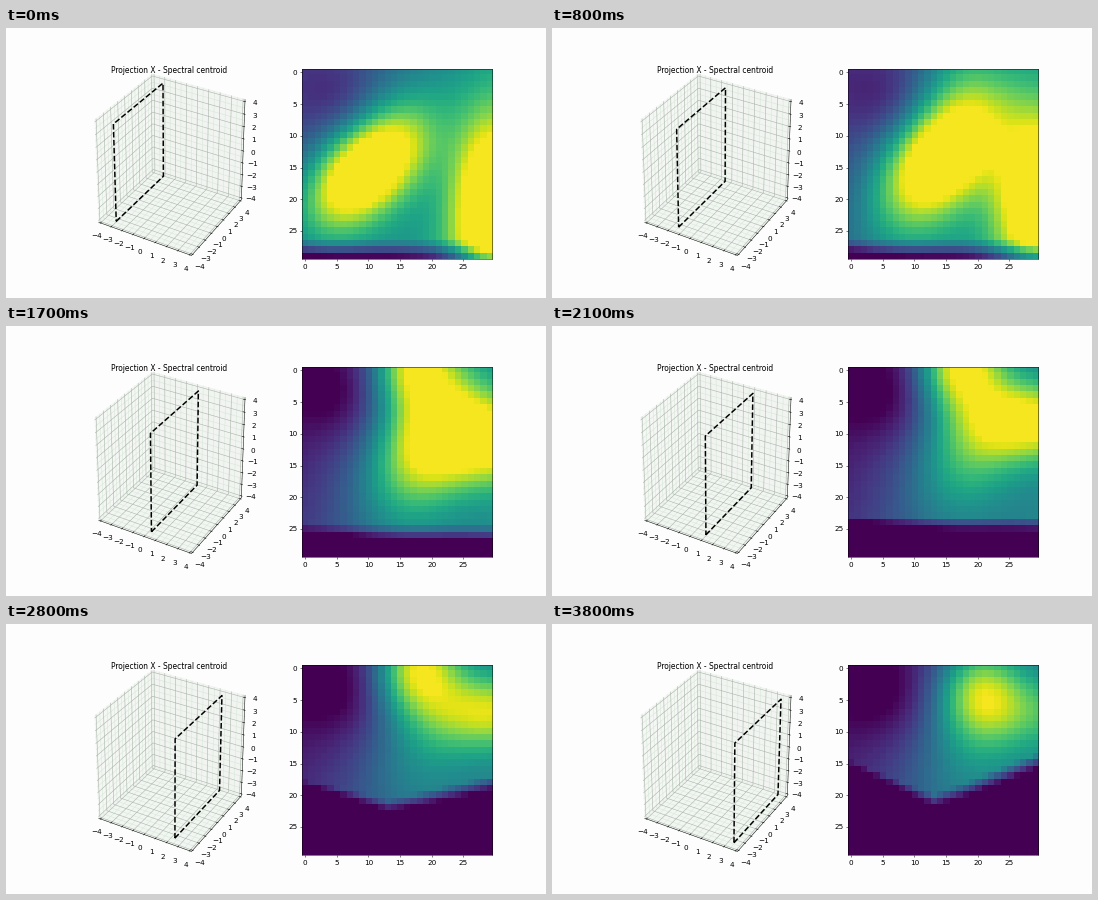
A matplotlib script for the animation above (3.9 s loop, 540 px wide and 270 px high).

```python
import numpy as np
import matplotlib.pyplot as plt
from matplotlib.animation import FuncAnimation

FRAMES = 39
LAST_STEP = 34          # the slice reaches the far side and rests there
HALF = 25 / 48          # half of the padded unit cube
LABEL = HALF + 0.072    # distance of tick labels from the centre
PAPER = "#fefdfe"
TICKS = range(-4, 5)

plt.rcParams["font.family"] = "DejaVu Sans"
fig = plt.figure(figsize=(12, 6), dpi=45, facecolor=PAPER)

# Pixel canvas for the cube
cube = fig.add_axes([0, 0, 1, 1])
cube.set_xlim(0, 540)
cube.set_ylim(270, 0)
cube.axis("off")

AZIM, ELEV = np.radians([-60, 30])
TOWARD = np.array([np.cos(ELEV) * np.cos(AZIM), np.cos(ELEV) * np.sin(AZIM), np.sin(ELEV)])
RIGHT = np.array([-np.sin(AZIM), np.cos(AZIM), 0])
UP = np.cross(TOWARD, RIGHT)


def project(points):
    """Perspective view of cube coordinates, in canvas pixels."""
    p = np.atleast_2d(np.asarray(points, float))
    depth = 10 - p @ TOWARD
    return 165.2 + 1028 * (p @ RIGHT) / depth, 133.5 - 1123.6 * (p @ UP) / depth


def line(points, **style):
    cube.plot(*project(points), **style)


def pane(corners, grey):
    cube.fill(*project(corners), color=(grey - 0.03, grey, grey - 0.03), alpha=0.5, lw=0.8)


def grid(values, **style):
    h = HALF
    for t in values:
        line([(t, -h, -h), (t, h, -h), (t, h, h)], **style)
        line([(h, t, -h), (-h, t, -h), (-h, t, h)], **style)
        line([(-h, -h, t), (-h, h, t), (h, h, t)], **style)


def tick_label(pos, value):
    x, y = project(pos)
    cube.text(x[0], y[0], str(value).replace("-", "\u2212"),
              ha="center", va="top", fontsize=11.5)


def draw_cube():
    h = HALF
    pane([(-h, -h, -h), (-h, h, -h), (-h, h, h), (-h, -h, h)], 0.95)
    pane([(-h, h, -h), (h, h, -h), (h, h, h), (-h, h, h)], 0.93)
    pane([(-h, -h, -h), (h, -h, -h), (h, h, -h), (-h, h, -h)], 0.94)
    grid(np.arange(-3.5, 4) / 8, color="#d6e6d6", lw=0.8)
    grid(np.arange(-4, 5) / 8, color="#a9b5a9", lw=0.9)

    edge = dict(color="black", lw=0.8)
    line([(-h, -h, -h), (h, -h, -h), (h, h, -h), (h, h, h)], **edge)

    out, inn = h + 0.1 / 12, h - 0.2 / 12
    for value in TICKS:
        t = value / 8
        line([(t, -out, -h), (t, -inn, -h)], **edge)
        line([(out, t, -h), (inn, t, -h)], **edge)
        line([(out, h, t), (inn, h, t)], **edge)
        tick_label((t, -LABEL, -LABEL), value)
        tick_label((LABEL, t, -LABEL), value)
        tick_label((LABEL, LABEL, t), value)

    cube.text(162.6, 45.3, "Projection X - Spectral centroid",
              ha="center", va="baseline", fontsize=12)


def ease(s, start, end):
    t = np.clip((s - start) / (end - start), 0, 1)
    return t * t * (3 - 2 * t)


def mix(a, b, t):
    return a + (b - a) * t


ROW, COL = np.mgrid[0:30, 0:30]


def blob(row, col, tall, wide, turn=0):
    """Gaussian hill; turn in degrees leans its wide axis upwards."""
    a = np.radians(turn)
    dx, dy = COL - col, row - ROW
    along = dx * np.cos(a) + dy * np.sin(a)
    across = dy * np.cos(a) - dx * np.sin(a)
    return np.exp(-((along / wide) ** 2 + (across / tall) ** 2) / 2)


def slice_image(step):
    s = step / LAST_STEP
    early, middle, late = ease(s, 0, 0.5), ease(s, 0.1, 0.6), ease(s, 0.75, 1)

    ground = mix(0.22, 0.03, middle) + 0.3 * COL / 29 + 0.005 * ROW
    hollow = 0.15 * blob(4, 5, 5, 5)
    main = mix(0.95, 0.22, ease(s, 0.3, 0.8)) * blob(
        mix(15.5, 11, early), mix(9.5, 19.5, early),
        mix(4.5, 5.5, early), mix(8, 9, early), mix(45, 60, early))
    ridge = (0.85 - 0.27 * middle - 0.33 * late) * blob(
        mix(22, 7, ease(s, 0.05, 0.75)), 29.5, mix(10, 4.2, middle), mix(4.2, 7, middle))
    crown = (0.75 * middle - 0.27 * late) * blob(
        mix(-1, 3.5, late), mix(17, 20, late), 5, 4.5)

    # Below this roof-shaped limit the field falls off quickly
    limit = mix(26.5, 20, ease(s, 0.2, 1)) - 6 * ease(s, 0.6, 1) * np.abs(COL - 13) / 15
    drop = 0.2 * np.maximum(ROW - limit, 0)
    return np.clip(ground - hollow + main + ridge + crown - drop, 0, 0.985)


def slice_outline(step):
    x = (-3.43 + 7 * (step + 3) / 37) / 8
    y, z = 3.65 / 8, 3.95 / 8
    return project([(x, -y, -z), (x, y, -z), (x, y, z), (x, -y, z), (x, -y, -z)])


draw_cube()
outline, = cube.plot(*slice_outline(0), "k--", lw=2.4)
heat = fig.add_subplot(1, 2, 2)
heat.tick_params(labelsize=11.5)
image = heat.imshow(slice_image(0), cmap="viridis", vmin=0, vmax=1)


def update(i):
    step = min(i, LAST_STEP)
    outline.set_data(*slice_outline(step))
    image.set_data(slice_image(step))
    return outline, image


anim = FuncAnimation(fig, update, frames=FRAMES, interval=100, repeat=True, repeat_delay=0)
plt.show()
```
